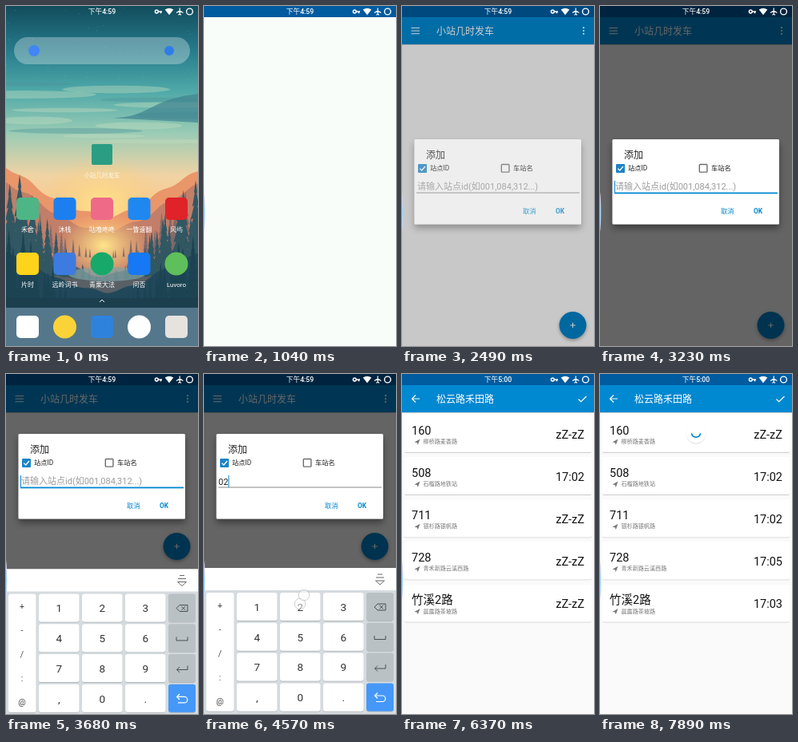
Recreate the animation shown at these times as an HTML page. Size 240x426 px, loop 7.99 s.

```html
<!DOCTYPE html>
<html lang="zh">
<head>
<meta charset="utf-8">
<title>Bus stop app</title>
<style>
html, body { margin: 0; width: 100%; height: 100%; overflow: hidden; background: #fafafa; }
svg { display: block; width: 100vw; height: 100vh; }
text { font-family: Roboto, "Noto Sans CJK SC", "Noto Sans CJK", sans-serif; white-space: pre; }
</style>
</head>
<body>
<svg id="stage" viewBox="0 0 240 426"></svg>
<script>
const LOOP = 7990, FRAME = 100;
const BLUE = '#0288d1', DEEP = '#005b9f', PAPER = '#fafafa';
const APP = '小站几时发车', STOP = '松云路禾田路';

const rect = (x, y, w, h, fill, extra = '') =>
  `<rect x="${x}" y="${y}" width="${w}" height="${h}" fill="${fill}" ${extra}/>`;
const disc = (x, y, r, fill, extra = '') =>
  `<circle cx="${x}" cy="${y}" r="${r}" fill="${fill}" ${extra}/>`;
const oval = (x, y, rx, ry, fill, extra = '') =>
  `<ellipse cx="${x}" cy="${y}" rx="${rx}" ry="${ry}" fill="${fill}" ${extra}/>`;
const shape = (d, fill, extra = '') => `<path d="${d}" fill="${fill}" ${extra}/>`;
const line = (d, color, width = 1, extra = '') =>
  `<path d="${d}" fill="none" stroke="${color}" stroke-width="${width}" ${extra}/>`;
const text = (x, y, s, size, fill, extra = '') =>
  `<text x="${x}" y="${y}" font-size="${size}" fill="${fill}" ${extra}>${s}</text>`;
const mid = (x, y, s, size, fill, extra = '') =>
  text(x, y, s, size, fill, `text-anchor="middle" ${extra}`);
const group = (id, body) => `<g id="${id}">${body}</g>`;
const fade = (id, ...colors) => `<linearGradient id="${id}" x2="0" y2="1">` +
  colors.map((c, i) => `<stop offset="${i / (colors.length - 1)}" stop-color="${c}"/>`).join('') +
  '</linearGradient>';
const shadow = (id, dy, blur, alpha) =>
  `<filter id="${id}" x="-40%" y="-40%" width="180%" height="180%">` +
  `<feDropShadow dx="0" dy="${dy}" stdDeviation="${blur}" flood-opacity="${alpha}"/></filter>`;
const repeat = (n, make) => Array.from({ length: n }, (_, i) => make(i)).join('');

let seed = 11;
const rand = () => (seed = (seed * 16807) % 2147483647) / 2147483647;
const edgeness = x => Math.abs(x - 122) / 120;

// Land that rises towards both sides.
function ridge(base, rise, bump, fill) {
  const points = repeat(61, i => {
    const x = i * 4;
    const y = base - rise * edgeness(x) ** 1.3 + bump * Math.sin(x / 9 + base) * Math.sin(x / 23);
    return `L${x},${y.toFixed(1)}`;
  });
  return shape(`M0,426${points}L240,426Z`, fill);
}

function pine(x, base, h, fill) {
  let left = '', right = '';
  for (let i = 1; i <= 7; i++) {
    const y = base - h + h * i / 7, w = h * 0.018 * i;
    left += `L${x - w},${y}L${x - w / 2},${y - 1}`;
    right = `L${x + w / 2},${y - 1}L${x + w},${y}` + right;
  }
  return shape(`M${x},${base - h}${left}${right}Z`, fill);
}

const forest = (count, base, tall, fill) => repeat(count, i => {
  const x = 240 * (i + rand()) / count, e = edgeness(x);
  return pine(x, base - 14 * e, 8 + tall * e ** 1.5 * (0.5 + rand() / 2), fill);
});

function wallpaper() {
  const stars = repeat(40, () => disc(240 * rand(), 110 * rand(), 0.4, '#b5dce0', 'opacity=".6"'));
  const clouds = repeat(12, i => oval(240 * rand(), 98 + 6.5 * i, 40 + 50 * rand(), 2 + 3 * rand(),
    i % 3 ? '#c4dcbd' : '#4d9198', 'opacity=".4"'));
  return rect(0, 0, 240, 426, 'url(#sky)') + stars + clouds +
    shape('M240,110Q205,114 180,128T128,140L240,146Z', '#3f8390', 'opacity=".7"') +
    oval(120, 250, 80, 62, 'url(#sun)') +
    ridge(266, 62, 4, '#e9966a') + ridge(284, 62, 4, '#c27e68') +
    oval(122, 300, 58, 42, 'url(#sun)') +
    forest(30, 318, 95, '#80696a') +
    ridge(338, 50, 3, '#586066') + forest(40, 346, 142, '#315762') +
    oval(126, 336, 48, 9, '#7fa3a6', 'opacity=".7"') +
    ridge(360, 52, 3, '#21485a') + forest(34, 384, 112, '#1b4352') +
    rect(0, 366, 240, 60, '#1b3f4d');
}

function tile(i, y, [fill, round, label]) {
  const x = 27 + 46.5 * i;
  const mark = round ? disc(x, y, 14.5, fill) : rect(x - 14, y - 14, 28, 28, fill, 'rx="5"');
  return mark + (label ? mid(x, y + 29, label, 8, '#fff') : '');
}

const apps = [
  ['#4eb586', 0, '禾舍'], ['#1c7ff0', 0, '沐栈'], ['#ef6a86', 0, '咕噜咚咚'], ['#1e88f0', 0, '一瞥速翻'], ['#df2329', 0, '风屿'],
  ['#fdd31b', 0, '片时'], ['#3d7be0', 0, '远岭词书'], ['#17a96a', 1, '青栗大法'], ['#1678f5', 0, '问否'], ['#5fbf5a', 1, 'Luvoro']];
const dock = [['#fff', 0], ['#fbd338', 1], ['#2f82dc', 0], ['#fff', 1], ['#e6e3df', 0]];

function home() {
  return wallpaper() +
    rect(10, 39, 220, 34, '#fff', 'rx="17" opacity=".3"') +
    disc(35, 56, 7, '#4285f4') + disc(204, 56, 6, '#2f7de6') +
    rect(107, 173, 26, 26, '#2a9d83', 'rx="2"') + mid(120, 214.5, APP, 7.5, '#fff', 'opacity=".8"') +
    apps.map((app, i) => tile(i % 5, i < 5 ? 254 : 323, app)).join('') +
    line('M117,371L120,368 123,371', '#fff') +
    rect(0, 378, 240, 48, '#8fb0cc', 'opacity=".5"') +
    dock.map((app, i) => tile(i, 402, app)).join('');
}

const bar = rect(0, 14, 240, 34, BLUE, 'filter="url(#soft)"');

function mainPage() {
  return rect(0, 0, 240, 426, PAPER) + rect(0, 0, 240, 14, DEEP) + bar +
    repeat(3, i => rect(11.5, 27 + 3.6 * i, 10.5, 1, '#fff') + disc(227, 27.2 + 3.8 * i, 1.1, '#fff')) +
    text(43, 35.7, APP, 12, '#fff') +
    group('fab', disc(0, 0, 17, '#0280c6', 'filter="url(#drop)"') + line('M-3.2,0H3.2M0,-3.2V3.2', '#fff'));
}

function dialog() {
  return rect(15.5, 167, 208.5, 106.5, '#fff', 'rx="1.5" filter="url(#deep)"') +
    text(30, 191, '添加', 12, '#222') +
    rect(20, 198, 11, 11, '#1c84c6', 'rx="1"') + line('M22.3,203.6L24.7,206 29,201', '#fff', 1.3) +
    text(35, 206.3, '站点ID', 8.3, '#222') +
    rect(124.3, 198.5, 9.6, 9.6, 'none', 'rx=".8" stroke="#6d6d6d" stroke-width="1.4"') +
    text(139, 206.3, '车站名', 8.3, '#222') +
    text(19, 230.2, '请输入站点id(如001,084,312...)', 11, '#9c9c9c', 'id="hint"') +
    text(18, 230.8, '', 11, '#222', 'id="typed"') +
    rect(18, 233.5, 204, 1, '#888', 'id="rule"') +
    rect(18, 219, 1, 15, BLUE, 'id="caret"') +
    text(151, 260, '取消', 8.3, BLUE) + text(192, 260, 'OK', 8.3, BLUE, 'font-weight="700"');
}

const KEYS = '123456789,0.';
const keyAt = i => [41 + 54 * (i % 3), 274 + 37.8 * (i / 3 | 0)];

function keyboard() {
  const cap = (x, y, w, h, fill) => rect(x, y, w, h, fill, 'rx="3" filter="url(#soft)"');
  return rect(0, 243, 240, 183, '#d5dbdf') + rect(0, 243, 240, 28, '#fff') +
    line('M217,251H223M215,255H225M214.5,259H225.5L220,264Z', '#666') +
    cap(3, 274, 34.5, 148.5, '#fff') +
    repeat(5, i => mid(20, 293.5 + 30 * i, '+-/:@'[i], 10.5, '#444')) +
    repeat(12, i => {
      const [x, y] = keyAt(i);
      return cap(x, y, 50.5, 35, '#fff') + mid(x + 25.3, y + 22.8, KEYS[i], 13.5, '#333');
    }) +
    repeat(4, i => cap(203, keyAt(3 * i)[1], 34, 35, i < 3 ? '#b9c1c5' : '#4598f7')) +
    line('M217,288H227V296H217L213,292ZM219.5,289.7L224,294.3M224,289.7L219.5,294.3' +
      'M213,328V332.5H227V328M227,364V369H213.5M217,365.5L213.5,369 217,372.5', '#4a5054') +
    line('M217,399.5L213.5,403 217,406.5M213.5,403H223A3.7,3.7 0 0 1 223,410.5H215', '#fff', 1.2);
}

const buses = [
  ['160', '柳桥路麦香路', 'zZ-zZ'], ['508', '石榴路地铁站', '17:02'], ['711', '银杉路银帆路', '17:02'],
  ['728', '青禾新路云溪西路', '17:05'], ['竹溪2路', '晨露路茶坡路', '17:03']];

function detail() {
  const card = ([name, stop], i) => `<g transform="translate(0 ${53.1 * i})">` +
    rect(3, 51, 234, 47, '#fff', 'rx="2" filter="url(#soft)"') +
    text(12, 76, name, 14.5, '#111') +
    shape('M15.5,85.5L22.5,81.5 19.8,88.8 18.8,86Z', '#777') +
    text(26.5, 87.2, stop, 7.1, '#777') +
    text(228, 80.5, '', 14.5, '#111', 'class="due" text-anchor="end"') + '</g>';
  return rect(0, 48, 240, 378, PAPER) + bar +
    line('M22,31H12.5M17,26.5L12.5,31 17,35.5', '#fff', 1.2) +
    text(43, 35.7, APP, 12, '#fff', 'id="title"') +
    line('M220.5,31.5L223.7,34.7 230.5,28', '#fff', 1.2) +
    group('cards', buses.map(card).join('')) +
    group('spinner', disc(0, 0, 12.5, '#fff', 'filter="url(#soft)"') +
      group('arc', line('M-5.6,0.4A5.7,5.7 0 0 0 5.6,0.4', BLUE, 1.7)));
}

function status() {
  return mid(120, 10.3, '', 8.7, '#fff', 'id="clock" font-weight="500"') +
    disc(188.3, 7, 1.9, 'none', 'stroke="#fff" stroke-width="1.5"') +
    line('M190,7H195M193.5,7V9.3', '#fff', 1.6) +
    shape('M198.7,4.6Q204,1 209.3,4.6L204,11.3Z', '#fff') +
    line('M217.2,2.5V11M213,8.5L217.2,6 221.4,8.5M215.4,11.3L217.2,10.3 219,11.3', '#fff', 1.2) +
    disc(229.5, 7, 3.9, 'none', 'stroke="#fff" stroke-width="1.4"');
}

const stage = document.getElementById('stage');
stage.innerHTML = '<defs>' +
  fade('sky', '#124c5c', '#25798a', '#4fa9a8', '#9bccb5', '#f1d3a4', '#fac585', '#f6ad72', '#d98f70', '#a87a70') +
  '<radialGradient id="sun"><stop stop-color="#ffe68c"/><stop offset="1" stop-color="#fbc777" stop-opacity="0"/></radialGradient>' +
  fade('edgeTint', '#f3d5e6', '#9fd8fb', '#d9d6f5') +
  shadow('soft', 0.7, 0.7, 0.25) + shadow('drop', 2, 2.2, 0.32) + shadow('deep', 5, 4.5, 0.4) + '</defs>' +
  group('home', home()) +
  group('splash', rect(0, 0, 240, 426, '#f9fdfa', 'id="sheet"') + rect(0, 0, 240, 14, DEEP, 'id="cap"')) +
  group('main', mainPage()) +
  rect(0, 0, 240, 426, '#000', 'id="dim"') +
  group('dialog', dialog()) + group('detail', detail()) + group('keyboard', keyboard()) +
  oval(-0.6, 258, 1.9, 26, 'url(#edgeTint)', 'id="edge"') +
  status() + group('touches', '');

const el = id => document.getElementById(id);
const dues = document.querySelectorAll('.due');
const set = (id, attrs) => { for (const k in attrs) el(id).setAttribute(k, attrs[k]); };
const move = (id, x, y, more = '') => set(id, { transform: `translate(${x} ${y}) ${more}` });
const show = (id, opacity) => set(id, { opacity, display: opacity > 0 ? 'inline' : 'none' });

const linear = p => p;
const easeOut = p => 1 - (1 - p) ** 3;

// Moves from u to v in hard steps counted from the start of the motion.
function tween(t, start, end, u, v, ease = linear) {
  const held = Math.floor((t - start) / FRAME) * FRAME;
  return u + (v - u) * ease(Math.min(1, Math.max(0, held / (end - start))));
}

// Finger marks: x, y, time of touch; each stays for HOLD ms.
const HOLD = 300, TYPED = '025';
const typeTime = i => 3910 + 450 * i;
const taps = [[120, 186, 100], [214, 401, 2150], [62, 226, 2810], [198, 166, 5000]];
[...TYPED].forEach((c, i) => {
  const [x, y] = keyAt(KEYS.indexOf(c));
  taps.push([x + 25, y + 14, typeTime(i)], [x + 30, y + 3, typeTime(i)]);
});
const mark = ([x, y]) =>
  disc(x, y, 6.8, '#fff', 'fill-opacity=".5" stroke="#999" stroke-opacity=".6" stroke-width=".8"');

function draw(t) {
  const open = tween(t, 360, 760, 0, 1, easeOut), shut = 1 - open;
  const box = { x: 107 * shut, y: 173 * shut, width: 240 - 214 * shut };
  show('splash', open);
  set('sheet', { ...box, height: 426 - 400 * shut, rx: 10 * shut });
  set('cap', { ...box, height: 14 * open });
  show('edge', +(open === 1));

  const lift = tween(t, 3350, 3550, 0, 1, easeOut);
  show('main', +(t >= 1230));
  move('fab', 213.5, 400 - 184 * lift, `scale(${tween(t, 1230, 1430, 0.3, 1)})`);

  const close = tween(t, 5110, 5310, 1, 0);
  show('dim', tween(t, 2370, 2670, 0, 0.6) * close);
  show('dialog', tween(t, 2370, 2670, 0, 1, easeOut) * close);
  move('dialog', 0, -92 * lift);
  const count = [...TYPED].filter((c, i) => t >= typeTime(i) + 200).length;
  const focus = t >= 3020;
  el('typed').textContent = TYPED.slice(0, count);
  show('hint', +!count);
  set('rule', focus && !count ? { fill: BLUE, height: 1.8 } : { fill: '#888', height: 1 });
  show('caret', +focus);
  set('caret', { x: 18 + 6.2 * count });

  const sunk = tween(t, 3250, 3750, 183, 0, easeOut) + tween(t, 5410, 5710, 0, 183);
  show('keyboard', +(sunk < 183));
  move('keyboard', 0, sunk);

  const loaded = t >= 6160;
  show('detail', tween(t, 5210, 5510, 0, 1));
  move('detail', 0, tween(t, 5210, 5510, 40, 0));
  el('title').textContent = loaded ? STOP : APP;
  el('clock').textContent = loaded ? '下午5:00' : '下午4:59';
  show('cards', +loaded);
  dues.forEach((due, i) => due.textContent = t >= 6270 + FRAME * i ? buses[i][2] : buses[0][2]);

  const pulling = t >= 7290 && t < 7790;
  show('spinner', +(t >= 7290));
  move('spinner', 120, tween(t, 7290, 7890, 46, 74, easeOut));
  set('arc', { transform: `rotate(${tween(t, 7290, 7890, -200, 0)})` });

  const marks = taps.filter(tap => t >= tap[2] && t < tap[2] + HOLD);
  if (pulling) marks.push([120, tween(t, 7290, 7690, 150, 329)]);
  el('touches').innerHTML = marks.map(mark).join('');
}

function play(now) {
  draw(now % LOOP);
  requestAnimationFrame(play);
}
draw(0);
requestAnimationFrame(play);
</script>
</body>
</html>
```
